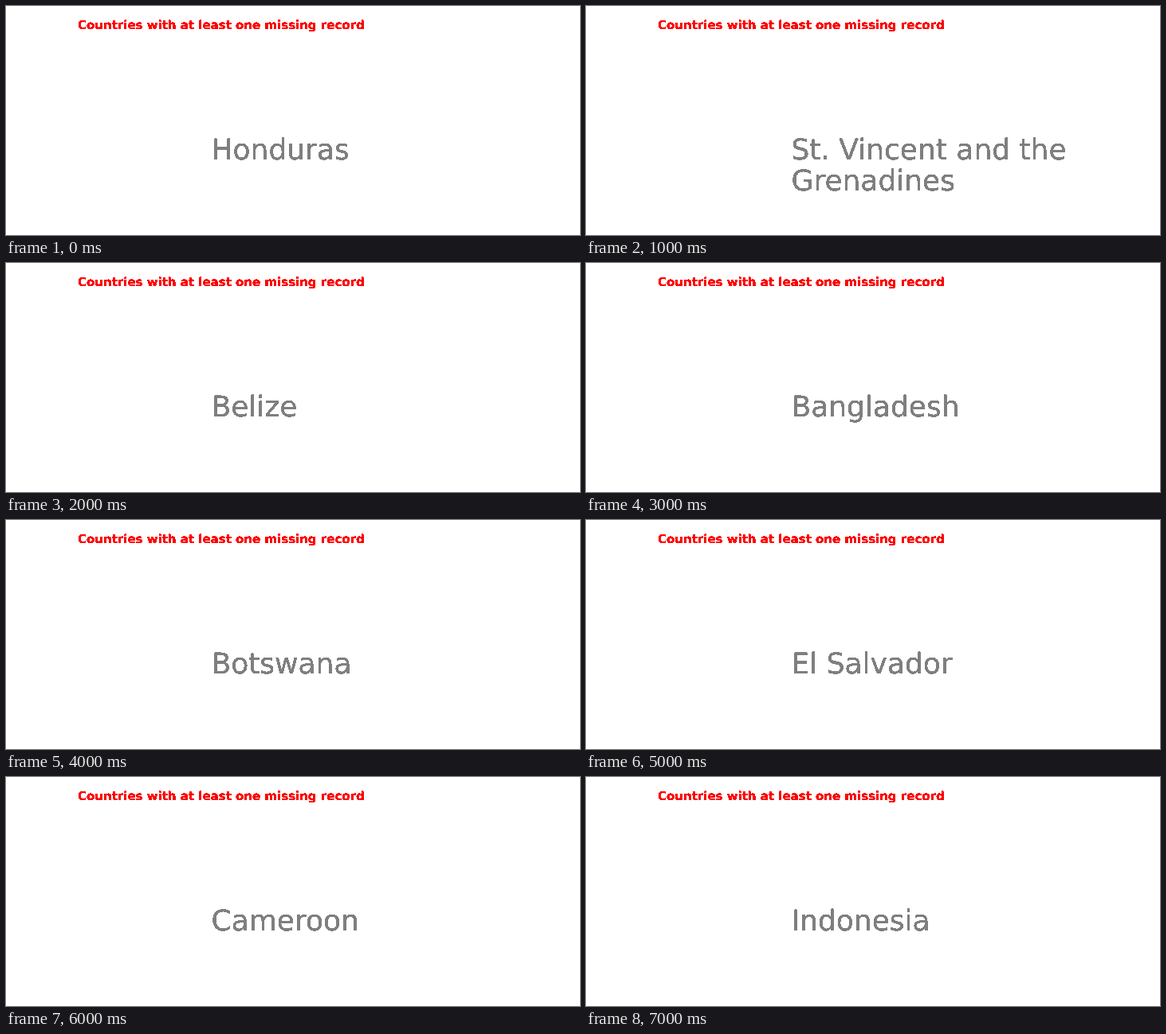
These frames come from a looping animation (720 px wide and 288 px high, 8 s). An HTML page:

```html
<!DOCTYPE html>
<html lang="en">
<head>
<meta charset="utf-8">
<title>Missing records</title>
<style>
  html, body { margin: 0; width: 100%; height: 100%; overflow: hidden; background: #fff; }
  svg { display: block; width: 720px; height: 288px; }
  text { font-family: "DejaVu Sans", sans-serif; text-rendering: geometricPrecision; }
  .title { font-size: 15px; font-weight: bold; fill: #f00; }
  .name {
    font-size: 36px; fill: #7f7f7f;
    visibility: hidden;
    animation: show 8s step-end calc(var(--i) * 1s) infinite;
  }
  /* each name holds one eighth of the loop */
  @keyframes show {
    0% { visibility: visible; }
    12.5%, 100% { visibility: hidden; }
  }
</style>
</head>
<body>
<svg viewBox="0 0 720 288">
  <!-- hard, unsmoothed glyph edges -->
  <filter id="hard" filterUnits="userSpaceOnUse" x="0" y="0" width="720" height="288" color-interpolation-filters="sRGB">
    <feComponentTransfer><feFuncA type="discrete" tableValues="0 1 1 1"/></feComponentTransfer>
  </filter>
  <g filter="url(#hard)">
    <text class="title" x="90" y="29">Countries with at least one missing record</text>
    <text class="name" style="--i:0" x="257.5" y="193">Honduras</text>
    <text class="name" style="--i:1" x="257.5" y="193">St. Vincent and the<tspan x="257.5" dy="39">Grenadines</tspan></text>
    <text class="name" style="--i:2" x="257.5" y="193">Belize</text>
    <text class="name" style="--i:3" x="257.5" y="193">Bangladesh</text>
    <text class="name" style="--i:4" x="257.5" y="193">Botswana</text>
    <text class="name" style="--i:5" x="257.5" y="193">El Salvador</text>
    <text class="name" style="--i:6" x="257.5" y="193">Cameroon</text>
    <text class="name" style="--i:7" x="257.5" y="193">Indonesia</text>
  </g>
</svg>
</body>
</html>
```
